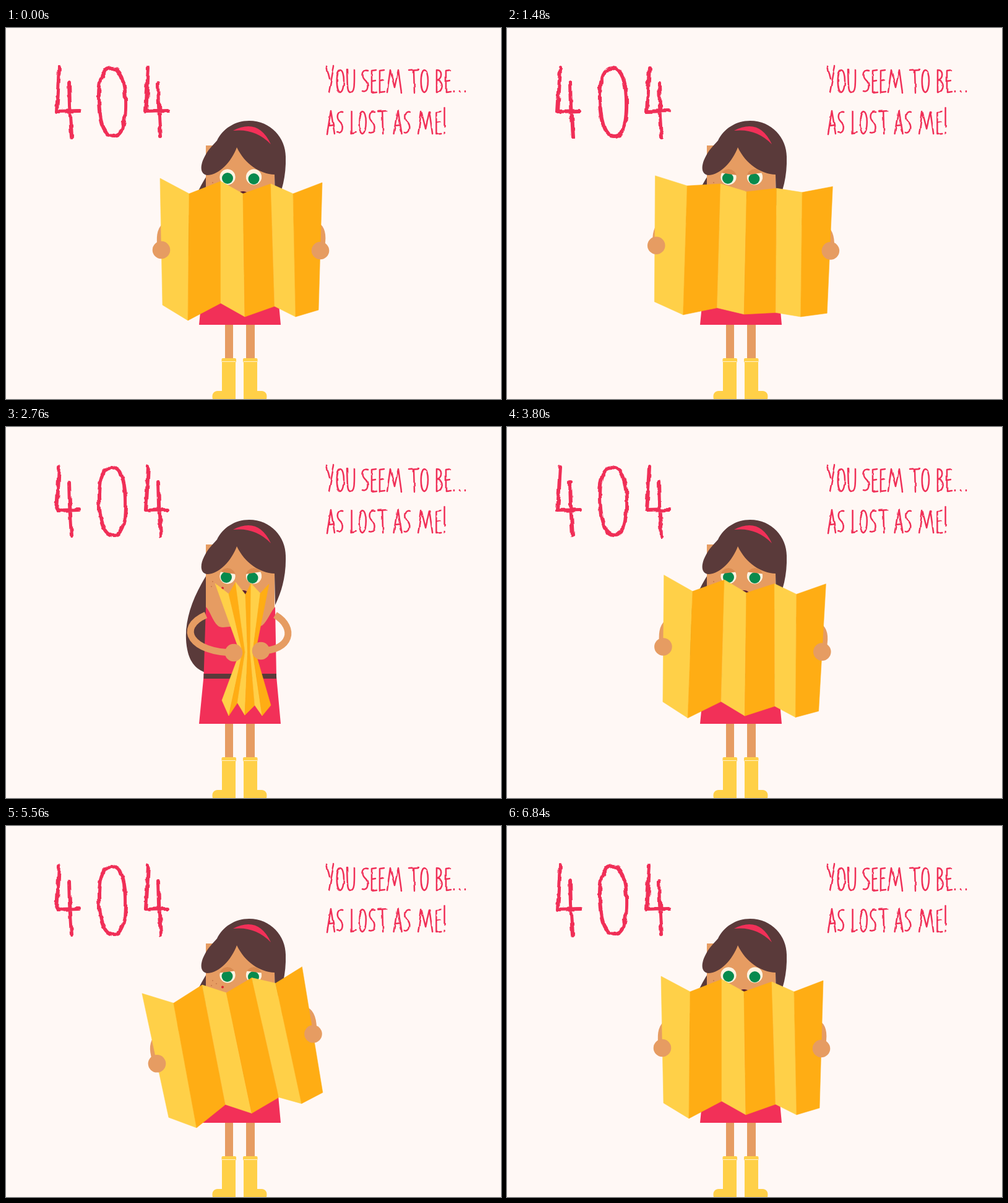
Write an HTML page that moves like this. It is 800 px wide and 600 px high and loops after 6880 ms.

```html
<!DOCTYPE html>
<html lang="en">
<head>
<meta charset="utf-8">
<title>404</title>
<style>
  html, body { margin: 0; width: 100%; height: 100%; overflow: hidden; background: #fff8f5; }
  svg { display: block; width: 800px; height: 600px; }
  .ink { fill: none; stroke: #f02f57; stroke-linecap: round; stroke-linejoin: round; }
  .hair { fill: #5a3a3a; }
  .skin { fill: #e69c62; }
  .dress { fill: #f23058; }
  .boot { fill: #ffd048; }
  .arm { fill: none; stroke: #e69c62; stroke-width: 11; }
</style>
</head>
<body>
<svg viewBox="0 0 800 600">
  <defs>
    <filter id="rough" x="-10%" y="-10%" width="120%" height="120%" color-interpolation-filters="sRGB">
      <feTurbulence type="fractalNoise" baseFrequency=".07" numOctaves="2"/>
      <feDisplacementMap in="SourceGraphic" scale="6" xChannelSelector="R" yChannelSelector="G"/>
    </filter>
    <filter id="soft" x="-10%" y="-10%" width="120%" height="120%" color-interpolation-filters="sRGB">
      <feTurbulence type="fractalNoise" baseFrequency=".05" numOctaves="2" seed="3"/>
      <feDisplacementMap in="SourceGraphic" scale="3" xChannelSelector="R" yChannelSelector="G"/>
    </filter>
    <clipPath id="eyeShape"><circle r="13"/></clipPath>
    <path id="four" d="M86 64L84 102 82 135 118 134M102 89L103 125 106 176"/>
  </defs>

  <g class="ink" stroke-width="6" filter="url(#rough)" role="img" aria-label="404">
    <use href="#four"/>
    <path d="M171 65C158 64 150 82 150 110C150 145 156 175 174 175C190 174 194 148 193 115C192 88 186 66 171 65Z"/>
    <use href="#four" x="144"/>
  </g>
  <g id="words" class="ink" stroke-width="2.5" filter="url(#soft)" role="img" aria-label="You seem to be... as lost as me!"/>

  <path class="hair" d="M325 238C300 278 285 320 293 360C297 381 308 392 322 397Z"/>
  <path class="skin" d="M323 190H434V328H323ZM354 478H367V536H354ZM388 478H402V536H388Z"/>
  <path class="dress" d="M323 291C329 296 334 314 342 321C346 325 352 324 362 323C380 325 405 325 414 321C422 315 428 298 435 291L437 403 444 480H312L319.500 403Z"/>
  <path class="hair" d="M319.500 399H437V407H319.500Z"/>
  <g id="boots">
    <g id="boot">
      <path class="boot" d="M349 540H371V600H334C332 592 336 587 342 587H349Z"/>
      <rect class="boot" x="348.500" y="534" width="23.500" height="7" rx="2"/>
      <path d="M349 539.500H371" stroke="#fff3d0"/>
    </g>
    <use href="#boot" transform="matrix(-1 0 0 1 755 0)"/>
  </g>

  <g fill="#c9784a">
    <circle cx="334" cy="250" r="1"/><circle cx="340" cy="255" r="1"/><circle cx="332" cy="258" r="1"/>
  </g>
  <circle cx="350" cy="260.500" r="2" fill="#d8232f"/>
  <ellipse cx="383" cy="271" rx="9" ry="7" fill="#5a2030"/>
  <g id="eyes"/>

  <path class="hair" d="M373 193C365 215 345 238 325 238C313 236 314 222 320 210C326 197 334 190 341 182C350 163 370 150 393 150C428 150 452 178 452 208C453 240 446 265 435 288L434 237C410 236 386 220 373 193Z"/>
  <path class="dress" d="M367 166Q408 145 428 188Q403 162 367 166Z"/>

  <path id="armL" class="arm"/>
  <path id="armR" class="arm"/>
  <g id="map"/>
  <circle id="handL" class="skin" r="14.300"/>
  <circle id="handR" class="skin" r="14.300"/>
</svg>

<script>
const $ = id => document.getElementById(id);
const add = (parent, tag, attrs) => {
  const el = document.createElementNS("http://www.w3.org/2000/svg", tag);
  set(el, attrs);
  return parent.appendChild(el);
};
const set = (el, attrs) => { for (const k in attrs) el.setAttribute(k, attrs[k]); };

// Hand lettering: [width, strokes] with the baseline at zero
const glyphs = {
  Y: [12, "M0-42L5-22M12-43L4 0"],
  O: [13, "M6-36C-1-34-1-2 6 0C14-2 14-36 6-36"],
  U: [13, "M0-37C1-10 0 0 6 0C13 0 12-15 12-37"],
  S: [10, "M9-35C0-38-2-26 4-20C11-14 10 1 0-2"],
  E: [9, "M8-36L1-35 1 0 9-1M1-18L7-19"],
  M: [24, "M0 0L5-36 12-8 18-36 23 0"],
  T: [14, "M0-36L14-37M7-36L8 0"],
  B: [11, "M1 0L1-36C11-37 10-21 2-20C13-20 12 0 1 0"],
  A: [12, "M0 0L6-37 12 0M2-13L10-14"],
  L: [8, "M1-36L1 0 8-2"],
  "!": [2, "M1-42L1-11M1-2L1-1"],
  ".": [5, "M1-2L1-1"],
  " ": [4, ""]
};
function letter(text, x, y, gap) {
  for (const ch of text.toUpperCase()) {
    const [width, d] = glyphs[ch];
    add($("words"), "path", { d, transform: `translate(${x} ${y})` });
    x += width + gap;
  }
}
letter("You seem to be...", 518, 104, 4);
letter("as lost as me!", 519, 171, 4.2);

// Upright map shapes: fold tops, waist, fold bottoms, hands, arm control points
const pairs = list => list.reduce((out, v, i) => (i % 2 ? out[out.length - 1].push(v) : out.push([v]), out), []);
function shape(top, bottom, hands, arms, waist) {
  const t = pairs(top), b = pairs(bottom);
  const mid = t.map((p, i) => waist ? [waist[0] + (waist[1] - waist[0]) * i / 6, 364] : [(p[0] + b[i][0]) / 2, (p[1] + b[i][1]) / 2]);
  return [...t, ...mid, ...b, ...pairs(hands), ...pairs(arms)];
}
const folded = shape(
  [249, 243, 296, 268, 347, 248, 383, 268, 428, 252, 464, 268, 511, 250],
  [253, 448, 294, 473, 347, 445, 386, 467, 434, 450, 468, 467, 505, 456],
  [251, 359, 508, 360], [280, 320, 240, 300, 480, 320, 523, 300]);
const wide = shape(
  [235.6, 242.2, 287.6, 257.3, 341.6, 252.9, 384, 264.5, 432.4, 258, 473.8, 263.6, 522.7, 253],
  [239.2, 446, 286, 466, 340.6, 453.5, 384.5, 462.8, 435.5, 459, 476, 464.7, 518.4, 458],
  [240, 355, 521.7, 357], [275, 320, 233, 300, 486, 320, 527, 300]);
const crushed = shape(
  [338, 253, 360, 270, 371, 251, 387, 271, 396, 253, 411, 269, 425, 254],
  [349, 442, 360, 467, 374, 446, 386, 466, 402, 450, 414, 467, 428, 450],
  [368, 365, 412, 362], [275, 325, 300, 365, 470, 325, 460, 362], [378, 403]);

// time, map shape, map angle, lid closing, lid slant, gaze
const keys = [
  [0, folded, 0, 0, 0, 0],
  [160, folded, 0, 0, 0, 0],
  [800, wide, 8.9, 1, 9, 0],
  [1000, wide, 8.9, 1, 9, 0],
  [1900, wide, -4.8, 1, 9, -2],
  [2350, wide, -4.8, 1, 9, -2],
  [2700, crushed, 0, 1, 9, -2],
  [3040, crushed, 0, 1, 9, -2],
  [3600, folded, 1.6, 1, -7, 0],
  [4150, folded, 1.6, 1, -7, 0],
  [5450, folded, -11, 1, -7, -0.5],
  [5700, folded, -11, 1, -7, -0.5],
  [6500, folded, 0, 0, 0, 0],
  [6880, folded, 0, 0, 0, 0]
];
const LOOP = 6880;
const mix = (a, b, k) => a + (b - a) * k;
const ease = k => k * k * (3 - 2 * k);

const panels = Array.from({ length: 6 }, (_, i) => {
  const color = i % 2 ? "#ffad14" : "#ffd048";
  return add($("map"), "polygon", { fill: color, stroke: color, "stroke-width": .6 });
});
const eyes = [[358, 241, 2], [400.5, 241, 3]].map(([x, y, drop], i) => {
  const g = add($("eyes"), "g", { transform: `translate(${x} ${y})`, "clip-path": "url(#eyeShape)" });
  add(g, "circle", { r: 12.7, fill: "#fdf3e2" });
  const pupil = add(g, "circle", { r: 9, cy: drop, fill: "#078a4d" });
  const lid = add(g, "rect", { x: -20, y: -40, width: 40, height: 35, fill: "#d98a50" });
  return { pupil, lid, side: i ? -1 : 1 };
});
const noise = document.querySelector("#rough feTurbulence");

function draw(now) {
  const t = now % LOOP;
  const n = keys.findIndex(key => key[0] > t);
  const a = keys[n - 1], b = keys[n];
  const k = ease((t - a[0]) / (b[0] - a[0]));
  const [angle, close, slant, gaze] = [2, 3, 4, 5].map(i => mix(a[i], b[i], k));

  // The map and hands turn about a point low on the map
  const c = Math.cos(angle * Math.PI / 180), s = Math.sin(angle * Math.PI / 180);
  const p = a[1].map(([x, y], i) => {
    const dx = mix(x, b[1][i][0], k) - 379, dy = mix(y, b[1][i][1], k) - 408;
    return [379 + dx * c - dy * s, 408 + dx * s + dy * c];
  });
  panels.forEach((el, i) =>
    set(el, { points: [i, i + 1, i + 8, i + 15, i + 14, i + 7].map(j => p[j]).join(" ") }));
  set($("handL"), { cx: p[21][0], cy: p[21][1] });
  set($("handR"), { cx: p[22][0], cy: p[22][1] });
  set($("armL"), { d: `M323 304C${p[23]} ${p[24]} ${p[21]}` });
  set($("armR"), { d: `M435 304C${p[25]} ${p[26]} ${p[22]}` });

  for (const { pupil, lid, side } of eyes) {
    set(pupil, { cx: gaze });
    set(lid, { transform: `translate(0 ${mix(-12, 0, close)}) rotate(${slant * side})` });
  }
  set(noise, { seed: Math.floor(t / 80) % 5 });
}
function tick(now) {
  draw(now);
  requestAnimationFrame(tick);
}
draw(0);
requestAnimationFrame(tick);
</script>
</body>
</html>
```
